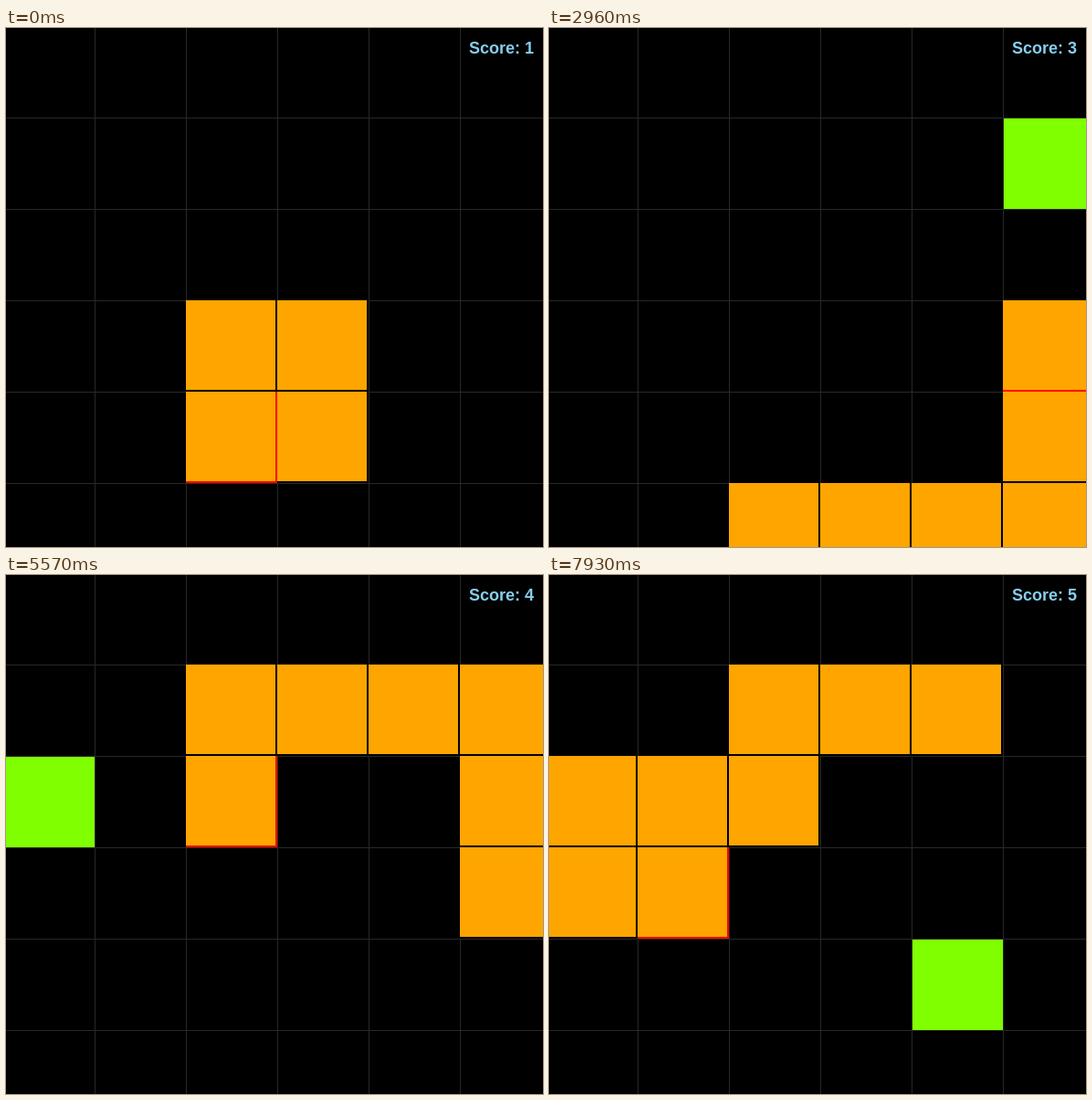
These frames come from a looping animation (588 px wide and 568 px high, 7.99 s). An HTML page with a canvas:

```html
<!DOCTYPE html>
<html lang="en">
<head>
<meta charset="utf-8">
<title>Snake</title>
<style>
  html, body { margin: 0; width: 100%; height: 100%; overflow: hidden; background: #000; }
  canvas { position: absolute; left: 0; top: 0; display: block; }
  #score {
    position: absolute; right: calc(100% - 578px); top: 12px;
    font: bold 18px/20px "Liberation Sans", Arial, sans-serif;
    color: #87ceeb; white-space: nowrap;
  }
</style>
</head>
<body>
<canvas id="board" width="588" height="568"></canvas>
<div id="score">Score: 1</div>
<script>
const LOOP = 7990, CELL = 100, LEFT = -3, TOP = -2;
const ctx = document.getElementById('board').getContext('2d');
const scoreLabel = document.getElementById('score');

const STEP = { U: [0, -1], D: [0, 1], L: [-1, 0], R: [1, 0] };
const START = [[2, 3], [3, 3], [3, 4], [2, 4]];

// Each run follows a pause: its first move swallows the last meal and reveals the next.
const RUNS = [
  { moves: 'DRR', times: [500, 620, 740], food: [4, 5] },
  { moves: 'RUUUU', times: [2780, 2840, 2960, 3080, 3140], food: [5, 1] },
  { moves: 'LLLDLL', times: [5270, 5330, 5450, 5570, 5630, 5750], food: [0, 2] },
  { moves: 'DR', times: [7810, 7930], food: [4, 4] }
];

function stateAt(time) {
  const trail = START.slice();
  let score = 1, food = null;
  for (const run of RUNS) {
    if (time < run.times[0]) break;
    score++;
    food = run.food;
    run.times.forEach((at, i) => {
      if (time < at) return;
      const [x, y] = trail[trail.length - 1];
      const [dx, dy] = STEP[run.moves[i]];
      trail.push([x + dx, y + dy]);
    });
  }
  return { score, food, body: trail.slice(-(score + 3)) };
}

function rect(color, x, y, w, h) {
  ctx.fillStyle = color;
  ctx.fillRect(x, y, w, h);
}

function drawGrid() {
  rect('#000', 0, 0, 588, 568);
  for (let i = 1; i < 6; i++) {
    rect('#282828', LEFT + i * CELL, 0, 1, 568);
    rect('#282828', 0, TOP + i * CELL, 588, 1);
  }
}

function drawSegment([col, row], edge) {
  const x = LEFT + col * CELL, y = TOP + row * CELL;
  rect(edge, x, y, CELL, CELL);
  rect('#ffa500', x, y, CELL - 2, CELL - 2);
}

function draw(time) {
  const { score, food, body } = stateAt(time);
  drawGrid();
  if (food) rect('#7fff00', LEFT + food[0] * CELL + 1, TOP + food[1] * CELL + 1, CELL - 1, CELL - 1);
  body.forEach((cell, i) => drawSegment(cell, i === body.length - 1 ? '#f00' : '#000'));
  scoreLabel.textContent = 'Score: ' + score;
}

const begin = performance.now();
function tick() {
  draw((performance.now() - begin) % LOOP);
  requestAnimationFrame(tick);
}
tick();
</script>
</body>
</html>
```
